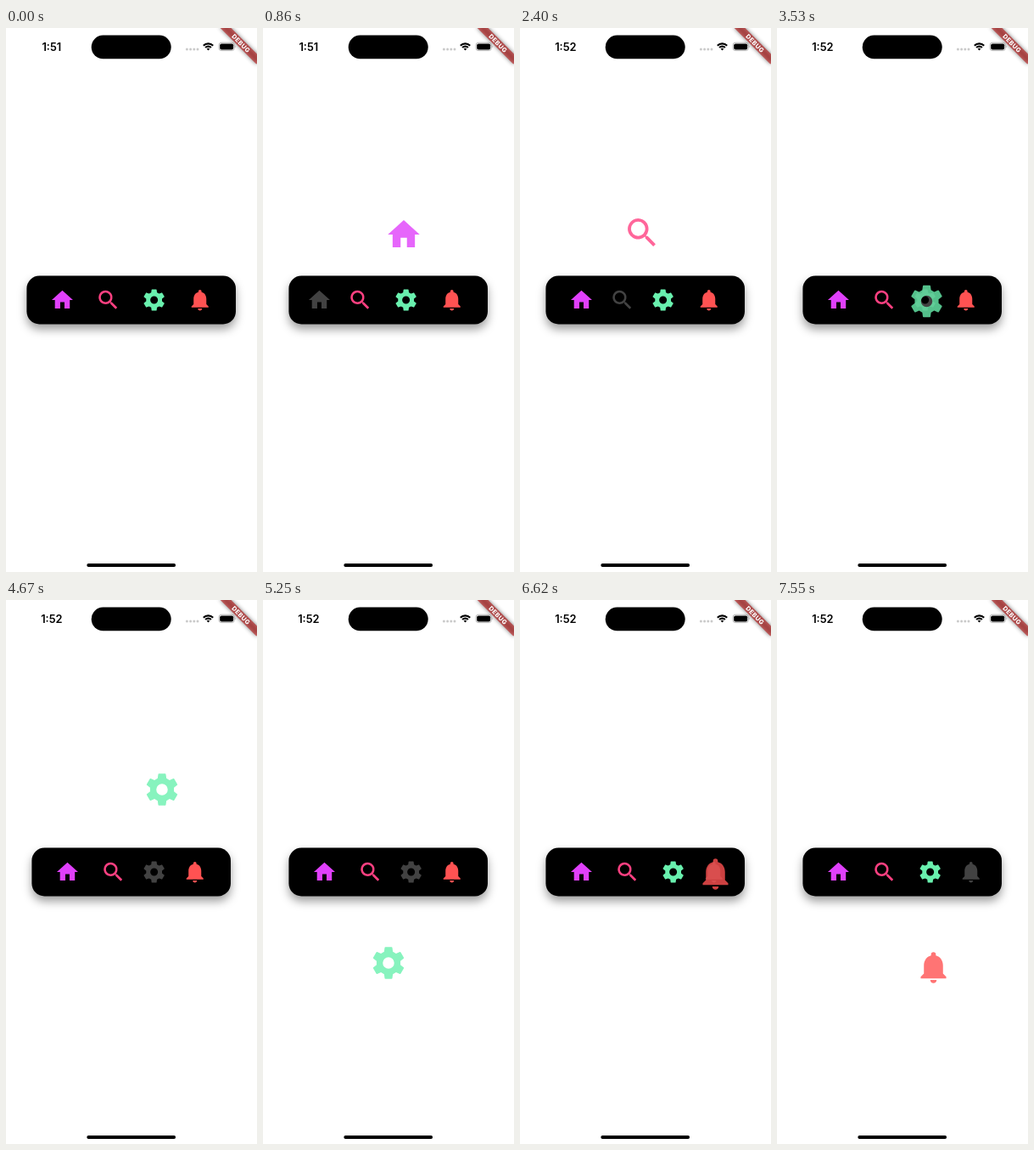
Recreate the animation shown at these times as an HTML page. Size 296 by 640 pixels, loop 8 s.

```html
<!DOCTYPE html>
<html lang="en">
<head>
<meta charset="utf-8">
<title>Draggable dock</title>
<style>
  html, body { margin: 0; width: 100%; height: 100%; overflow: hidden; background: #fff; }
  svg { display: block; width: 296px; height: 640px; }
  text { font-family: Inter, sans-serif; text-anchor: middle; }
</style>
</head>
<body>
<svg viewBox="0 0 296 640">
  <defs>
    <filter id="soft" x="-30%" y="-100%" width="160%" height="300%"><feGaussianBlur stdDeviation="5.5"/></filter>
    <filter id="bannerBlur" x="-30%" y="-200%" width="160%" height="500%"><feGaussianBlur stdDeviation="2.8"/></filter>
  </defs>

  <!-- status bar -->
  <text id="clock" x="53.8" y="26.5" font-size="12.8" font-weight="600"></text>
  <rect x="100.7" y="8.6" width="94" height="27.6" rx="13.8"/>
  <g fill="#cacaca">
    <circle cx="213.4" cy="25" r="1.5"/><circle cx="217.6" cy="25" r="1.5"/>
    <circle cx="221.8" cy="25" r="1.5"/><circle cx="226" cy="25" r="1.5"/>
  </g>
  <g transform="translate(238.5 26.4)" fill="none" stroke="#000" stroke-width="2.1">
    <path d="M-5.7-5.7A8.1 8.1 0 0 1 5.7-5.7M-3.4-3.4A4.8 4.8 0 0 1 3.4-3.4"/>
    <path d="M0 0L-1.8-1.8A2.5 2.5 0 0 1 1.8-1.8Z" fill="#000" stroke="none"/>
  </g>
  <rect x="251" y="17.2" width="18.4" height="9.4" rx="3" fill="none" stroke="#a6a6a6" stroke-width=".8"/>
  <rect x="252.2" y="18.4" width="16" height="7" rx="1.9"/>
  <path d="M270.5 20.4q1.4 1.5 0 3z" fill="#a6a6a6"/>

  <!-- corner banner -->
  <g transform="translate(295.2 0) rotate(45)">
    <rect x="-30" y="21" width="60" height="9" fill-opacity=".5" filter="url(#bannerBlur)"/>
    <rect x="-30" y="21" width="60" height="9" fill="#b71c1c" fill-opacity=".627"/>
    <text y="28.2" font-size="7.3" font-weight="800" letter-spacing=".35" fill="#fff">DEBUG</text>
  </g>

  <!-- dock -->
  <rect class="bar" y="297.5" height="57" rx="15" fill-opacity=".38" filter="url(#soft)"/>
  <rect class="bar" y="291.5" height="57" rx="15"/>
  <g id="dock"></g>
  <path id="ghost" fill-rule="evenodd" opacity=".8"/>
  <rect x="95.3" y="630" width="104.8" height="4" rx="2"/>
</svg>
<script>
const LOOP = 8000, ICON = 1.252, GHOST = 1.878, PITCH = 54.1, SHIFT = 6, CENTER = 147.7;

// Six rounded teeth around a round hole, in a 24-unit icon box.
function gearPath() {
  let d = '';
  for (let k = 0; k < 6; k++) {
    const a = k * Math.PI / 3, c = Math.cos(a), s = Math.sin(a);
    const p = (x, y) => `${(12 + x * c - y * s).toFixed(2)} ${(12 + x * s + y * c).toFixed(2)} `;
    d += (k ? 'L' : 'M') + p(-2.75, -7.05) + 'L' + p(-2.39, -9.59) + 'Q' + p(-2.33, -10) + p(-1.92, -10)
       + 'L' + p(1.92, -10) + 'Q' + p(2.33, -10) + p(2.39, -9.59) + 'L' + p(2.75, -7.05);
  }
  return d + 'ZM8.4 12a3.6 3.6 0 1 0 7.2 0a3.6 3.6 0 1 0-7.2 0Z';
}

const icons = [
  { color: '#e040fb', d: 'M10 20v-6h4v6h5v-8h3L12 3 2 12h3v8z' },
  { color: '#ff4081', d: 'M15.5 14h-.79l-.28-.27A6.5 6.5 0 1 0 13.73 14.43l.27.28v.79l5 4.99L20.49 19zM9.5 14a4.5 4.5 0 1 1 0-9a4.5 4.5 0 1 1 0 9z' },
  { color: '#69f0ae', d: gearPath() },
  { color: '#ff5252', d: 'M12 22c1.1 0 2-.9 2-2h-4c0 1.1.89 2 2 2zm6-6v-5c0-3.07-1.64-5.64-4.5-6.32V4a1.5 1.5 0 0 0-3 0v.68C7.63 5.36 6 7.92 6 11v5l-2 2v1h16v-1z' }
];

// Pointer samples [time, x, y]; each holds until the next.
const drags = [
  { item: 0, end: 1600, path: [[500, 68, 322], [660, 91, 279], [860, 166, 243]] },
  { item: 1, end: 2920, path: [[2010, 122, 322], [2180, 125, 308], [2290, 136, 266], [2400, 144, 241]] },
  { item: 2, end: 5750, path: [
    [3530, 176.5, 321.5], [3860, 169, 304], [3970, 160.5, 262], [4080, 168, 229], [4200, 183, 215], [4350, 184.5, 214.5],
    [4670, 184, 223], [4790, 183, 259], [4900, 180, 310], [5020, 174, 362], [5130, 163, 402], [5250, 148, 427], [5370, 129, 446]] },
  { item: 3, end: LOOP, path: [
    [6620, 230.5, 322], [6820, 229, 331], [6930, 225, 352], [7040, 217, 376], [7150, 207, 399],
    [7270, 196, 417], [7380, 186.5, 428], [7550, 184.5, 432]] }
];

const $ = id => document.getElementById(id);
const set = (el, attrs) => { for (const k in attrs) el.setAttribute(k, attrs[k]); };
const place = (x, y, s) => `translate(${x} ${y}) scale(${s}) translate(-12 -12)`;

const cells = icons.map(({ d }) => {
  const el = document.createElementNS('http://www.w3.org/2000/svg', 'path');
  set(el, { d, 'fill-rule': 'evenodd' });
  return $('dock').appendChild(el);
});
const bars = document.querySelectorAll('.bar');

function draw(t) {
  const drag = drags.find(g => t >= g.path[0][0] && t < g.end);
  const half = drag ? 117.3 : 123.3;
  bars.forEach(bar => set(bar, { x: CENTER - half, width: 2 * half }));
  cells.forEach((cell, i) => {
    const shift = drag ? SHIFT * Math.sign(drag.item - i) : 0;
    set(cell, {
      transform: place(CENTER - .7 + (i - 1.5) * PITCH + shift + .6, 320, ICON),
      fill: drag && drag.item === i ? '#424242' : icons[i].color
    });
  });
  $('ghost').style.display = drag ? '' : 'none';
  if (drag) {
    const [, x, y] = drag.path.filter(p => p[0] <= t).pop();
    const { d, color } = icons[drag.item];
    set($('ghost'), { d, fill: color, transform: place(x, y, GHOST) });
  }
  $('clock').textContent = t < 1100 ? '1:51' : '1:52';
}

function tick() {
  draw(performance.now() % LOOP);
  requestAnimationFrame(tick);
}
tick();
</script>
</body>
</html>
```
